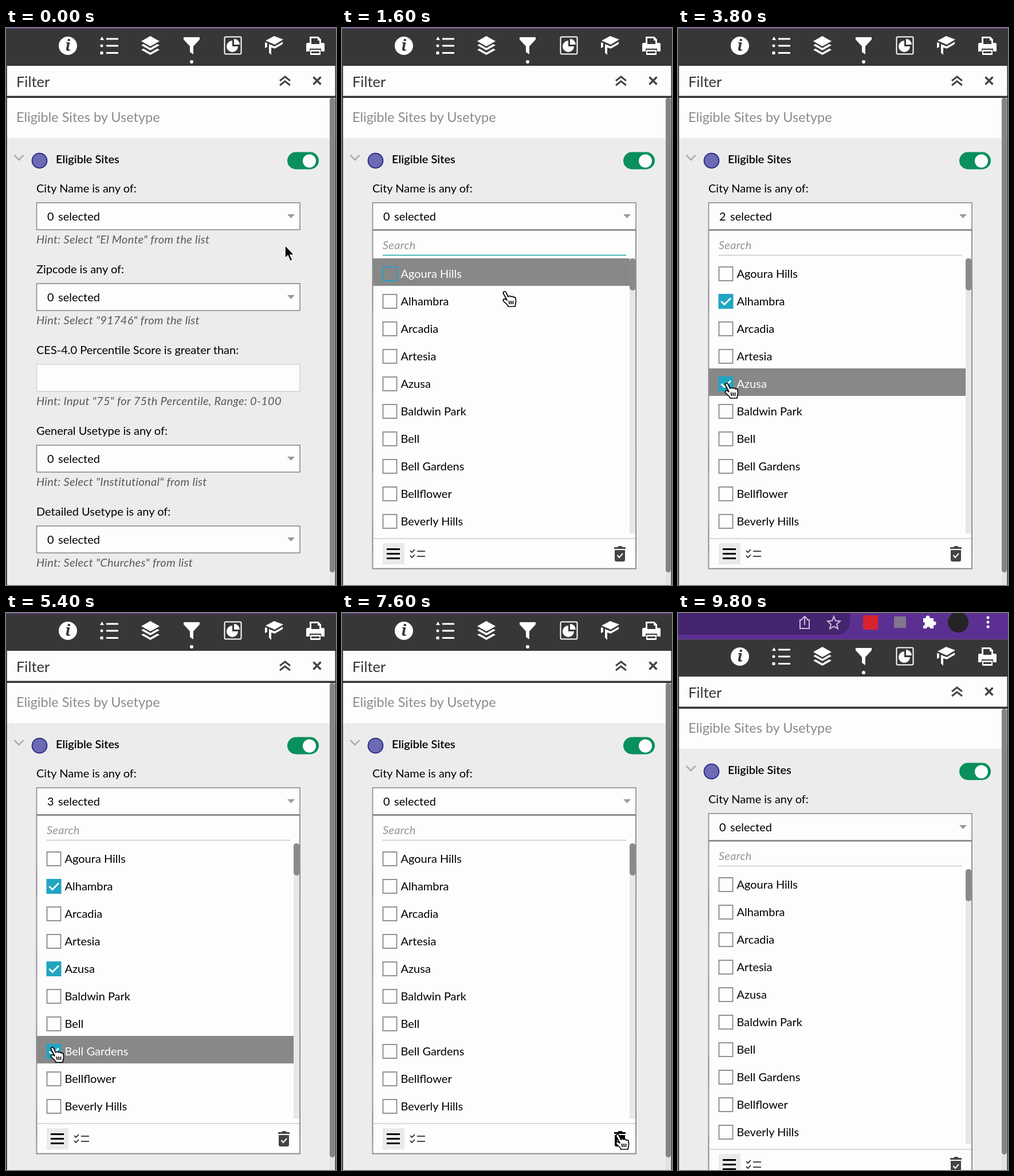
These frames come from a looping animation (576x972 px, 10000 ms). An HTML page:

```html
<!DOCTYPE html>
<html lang="en">
<head>
<meta charset="utf-8">
<title>Filter panel</title>
<style>
html, body { margin: 0; width: 100%; height: 100%; overflow: hidden; background: #ececec; }
svg { display: block; width: 576px; height: 972px; font: 20px Lato, sans-serif; }
text { white-space: pre; }
.line { fill: none; stroke: #fff; stroke-width: 3; }
.white { fill: #fdfdfd; }
.hint { font-style: italic; fill: #595959; letter-spacing: .27px; }
.field { fill: #fdfdfd; stroke: #8a8a90; stroke-width: 1.6; }
.field.plain { stroke: #d3d6e2; }
.bar { fill: none; }
.box { fill: #fdfdfd; stroke: #929296; stroke-width: 2; }
.tick { fill: none; stroke: #fff; stroke-width: 3; visibility: hidden; }
.hover .bar { fill: #888; }
.hover text { fill: #fff; }
.hover .box { fill: #888; stroke: #2c9cc8; }
.on .box { fill: #20a5c2; stroke: #20a5c2; }
.on .tick { visibility: inherit; }
</style>
</head>
<body>
<svg viewBox="0 0 576 972">
<g id="page">
  <g id="browser" transform="translate(0 -45)">
    <path fill="#5c3093" d="M0 0H576V46H0z"/>
    <path fill="#43246e" d="M0 0H300V16A22 22 0 0 1 278 38H0z"/>
    <g class="line" style="stroke:#cbbfdc;stroke-width:2">
      <path d="M217 12h-4v15h16v-15h-4M221 21V6m-5 5 5-5 5 5"/>
      <path d="m272 6 3 7.500 8 .7-6 5.300 2 8-7-4.200-7 4.200 2-8-6-5.300 8-.7z"/>
    </g>
    <path fill="#d8232f" d="M323 4h26v25h-26z"/>
    <path fill="#82758f" d="M377 6h21v20h-21z"/>
    <g fill="#fff">
      <path d="M428 9h18v18h-18z"/><circle cx="436" cy="8" r="3.500"/><circle cx="447" cy="18" r="3.500"/>
      <circle cx="541" cy="8" r="2.500"/><circle cx="541" cy="16" r="2.500"/><circle cx="541" cy="24" r="2.500"/>
    </g>
    <g fill="#5c3093"><circle cx="428" cy="19" r="3"/><circle cx="437" cy="27" r="3"/></g>
    <circle cx="489" cy="16" r="18" fill="#242424"/>
  </g>

  <path fill="#ececec" d="M0 0H576V972H0z"/>
  <path fill="#373737" d="M0 0H576V66H0z"/>
  <path fill="#66418a" d="M0 0H576V1.500H0z"/>

  <g id="toolbar" fill="#fff">
    <circle cx="108" cy="31" r="16"/>
    <text x="108" y="40" text-anchor="middle" fill="#373737" style="font:italic bold 27px 'Noto Serif',serif">i</text>
    <path d="m164 21 3.500-6 3.500 6z"/><circle cx="167" cy="31" r="2.500"/><path d="M164.500 41h5v5h-5z"/>
    <path class="line" d="M175 19h21M175 31h21M175 43.500h21"/>
    <path d="m252 14 16 9-16 9-16-9z"/>
    <path d="m236 30 4-2 12 7 12-7 4 2-16 9zM236 38l4-2 12 7 12-7 4 2-16 9z"/>
    <path d="M310 16h28v4l-11 12v14l-6-4V32L310 20z"/><circle cx="324" cy="59" r="3"/>
    <rect x="381.500" y="15.500" width="29" height="30" rx="2" class="line" style="stroke-width:2"/>
    <path d="M395 22a10 10 0 1 0 10 10h-10z"/><path d="M398 19v10h10a10 10 0 0 0-10-10z"/>
    <path d="m453 22 15-8 16 6-15 9zM452 25l4 1v7l-4 2zM459 28l10 4 14-8v4l-14 8-6-2v13l-4-4z"/>
    <path d="M530 15h15l5 5v8h-20z"/><path d="M526 26h28q2 0 2 3v12h-6v-5h-20v5h-6V29q0-3 2-3z"/>
    <path d="M531 38h18v9h-18z"/>
    <path d="M533 18h11v4h3v6h-14z" fill="#373737"/><path d="M533 41h14v3h-14z" fill="#373737"/>
  </g>

  <path class="white" d="M0 66H576V192H0z"/>
  <path fill="#333" d="M0 118.500H576V122H0z"/>
  <text x="18" y="103" font-size="25.500" fill="#333">Filter</text>
  <path class="line" style="stroke:#454545" d="m478 92 9-7 9 7M478 100l9-7 9 7"/>
  <path class="line" style="stroke:#454545;stroke-width:3.600" d="m536.500 85.500 13 13m0-13-13 13"/>
  <text x="18" y="164" font-size="23.500" fill="#8b8b8b">Eligible Sites by Usetype</text>
  <path fill="#e3e3e3" d="M565 122h9v850h-9z"/>
  <rect id="scrollThumb" x="565" y="122" width="9" rx="4.500" fill="#858585"/>
  <path fill="#333" d="M0 66h1.800V972H0zM574.500 66H576V972h-1.500z"/>

  <path class="line" style="stroke:#b0b0b0" d="m14.500 222 8 8 8-8"/>
  <circle cx="58.500" cy="231.500" r="13" fill="#6b6ab2" stroke="#1a1a82" stroke-width="1.600"/>
  <text x="87" y="236" font-weight="600">Eligible Sites</text>
  <rect x="491" y="216.500" width="55" height="30" rx="15" fill="#09905c"/>
  <circle cx="529.500" cy="232" r="11.500" class="white"/>

  <g id="fields"></g>

  <g id="dropdown">
    <path class="white" stroke="#8a8a8e" stroke-width="1.800" d="M53.500 352.500H513V943.500H53.500z"/>
    <path stroke="#8a8a8e" stroke-width="2.500" d="M53 352.500H513"/>
    <text x="71" y="386" class="hint" style="fill:#969696">Search</text>
    <path id="underline" stroke-width="1.500" d="M71 396.500H496"/>
    <path fill="#e8e8e8" d="M502 402h10v480h-10z"/>
    <rect x="502" y="402" width="10.500" height="56" rx="5" fill="#8a8a8a"/>
    <g id="rows"></g>
    <path stroke="#ccc" stroke-width="1.500" d="M55 891H512"/>
    <path fill="#ebe9ec" d="M71 899h38v37H71z"/>
    <path class="line" style="stroke:#000" d="M78 909.500h23M78 917.500h23M78 925.500h23"/>
    <path class="line" style="stroke:#444;stroke-width:2" d="m119 912 3 3 5-5M119 921l3 3 5-5M131 913h14M131 922h14"/>
    <g id="trash">
      <path d="M475 906h6l2-2h5l2 2h5v3h-20zM476 911h18v17q0 3-3 3h-12q-3 0-3-3z"/>
      <path class="line" style="stroke-width:2" d="m480.500 920 3.500 4 6-7"/>
    </g>
  </g>
</g>

<path id="arrow" fill="#000" stroke="#fff" stroke-width="1.500" d="M0 0V23l5-5 4 10 4-2-4-9h7z"/>
<g id="hand" fill="#fff" stroke="#000" stroke-width="1.700" stroke-linejoin="round">
  <path d="M-5 4c-2-3 2-6 4-3l4 8c1-2 4-2 5 0c1-1 4-1 4 1c2-1 4 0 4 2c1 4 1 6 0 9l-1 5H3c-1-4-5-6-8-9c-2-3 1-5 3-4l3 2z"/>
  <path fill="none" d="M4.500 16l1 6M8 16l.5 6M11.500 16v6"/>
</g>
</svg>

<script>
const LOOP = 10000, STEP = 200;
const ROW_TOP = 402, ROW_HEIGHT = 48;
const OPEN_AT = 1000, CLEAR_AT = 7200;
const checkedAt = { 1: 2600, 4: 3600, 7: 5000 };

const fields = [
  ['City Name is any of:', 'Hint: Select "El Monte" from the list'],
  ['Zipcode is any of:', 'Hint: Select "91746" from the list'],
  ['CES-4.0 Percentile Score is greater than:', 'Hint: Input "75" for 75th Percentile, Range: 0-100'],
  ['General Usetype is any of:', 'Hint: Select "Institutional" from list'],
  ['Detailed Usetype is any of:', 'Hint: Select "Churches" from list']
];
const cities = ['Agoura Hills', 'Alhambra', 'Arcadia', 'Artesia', 'Azusa',
  'Baldwin Park', 'Bell', 'Bell Gardens', 'Bellflower', 'Beverly Hills'];

// Cursor stops: time, x, y
const stops = [
  [0, 487, 379], [200, 487, 379], [600, 480, 335], [1000, 480, 335],
  [1600, 287, 460], [2200, 99, 478], [2800, 99, 478], [3400, 88, 620],
  [4000, 88, 620], [4600, 84, 758], [6000, 84, 758], [7000, 484, 910],
  [8400, 484, 910], [9200, 540, -40], [LOOP, 540, -40]
];

const $ = id => document.getElementById(id);
const ease = p => { p = Math.min(1, Math.max(0, p)); return p * p * (3 - 2 * p); };

$('fields').innerHTML = fields.map(([label, hint], i) => {
  const isInput = i === 2;
  const value = isInput ? '' : `<text x="72" y="31" class="count">0</text>
    <text x="91" y="31">selected</text><path fill="#999" d="M491 20h13l-6.500 7z"/>`;
  return `<g transform="translate(0 ${305 + 141 * i})">
    <text x="53" y="-18">${label}</text>
    <rect x="53.500" y="0" width="459.500" height="47" class="field ${isInput ? 'plain' : ''}"/>
    ${value}<text x="53" y="71" class="hint">${hint}</text></g>`;
}).join('');

$('rows').innerHTML = cities.map((city, i) =>
  `<g transform="translate(0 ${ROW_TOP + ROW_HEIGHT * i})">
    <path class="bar" d="M54 0H502V48H54z"/>
    <rect class="box" x="71.500" y="15" width="24" height="24"/>
    <path class="tick" d="m75.500 27 5.500 5.500 11-11"/>
    <text x="102.500" y="34">${city}</text></g>`).join('');

const rows = [...$('rows').children];
const count = document.querySelector('.count');

function cursorAt(t) {
  const i = Math.max(1, stops.findIndex(s => s[0] >= t));
  const [t0, x0, y0] = stops[i - 1], [t1, x1, y1] = stops[i];
  const p = ease((t - t0) / (t1 - t0));
  return [x0 + (x1 - x0) * p, y0 + (y1 - y0) * p];
}

function show(id, visible) {
  $(id).style.visibility = visible ? 'visible' : 'hidden';
}

function draw(t) {
  const open = t >= OPEN_AT;
  const [x, y] = cursorAt(t);
  // The highlighted row trails the cursor by one step.
  const [lagX, lagY] = cursorAt(Math.max(0, t - STEP));
  const hovered = lagX < 502 ? Math.floor((lagY - ROW_TOP) / ROW_HEIGHT) : -1;

  let selected = 0;
  rows.forEach((row, i) => {
    const on = t >= checkedAt[i] && t < CLEAR_AT;
    selected += on;
    row.classList.toggle('on', on);
    row.classList.toggle('hover', i === hovered);
  });
  count.textContent = selected;
  show('dropdown', open);
  $('underline').setAttribute('stroke', t < checkedAt[1] ? '#18a0a8' : '#c8cabc');
  $('trash').setAttribute('fill', x > 470 && x < 500 && y > 900 ? '#000' : '#444');

  const pointing = x < 513 && y > 305 && (open || y < 352);
  show('hand', pointing);
  show('arrow', !pointing);
  for (const id of ['hand', 'arrow']) $(id).setAttribute('transform', `translate(${x} ${y})`);

  const slide = ease((t - 9000) / 600);
  $('page').setAttribute('transform', `translate(0 ${45 * slide})`);
  $('scrollThumb').setAttribute('height', 828 - 50 * slide);
}

function frame() {
  const t = performance.now() % LOOP;
  draw(Math.floor(t / STEP) * STEP);
  requestAnimationFrame(frame);
}
frame();
</script>
</body>
</html>
```
